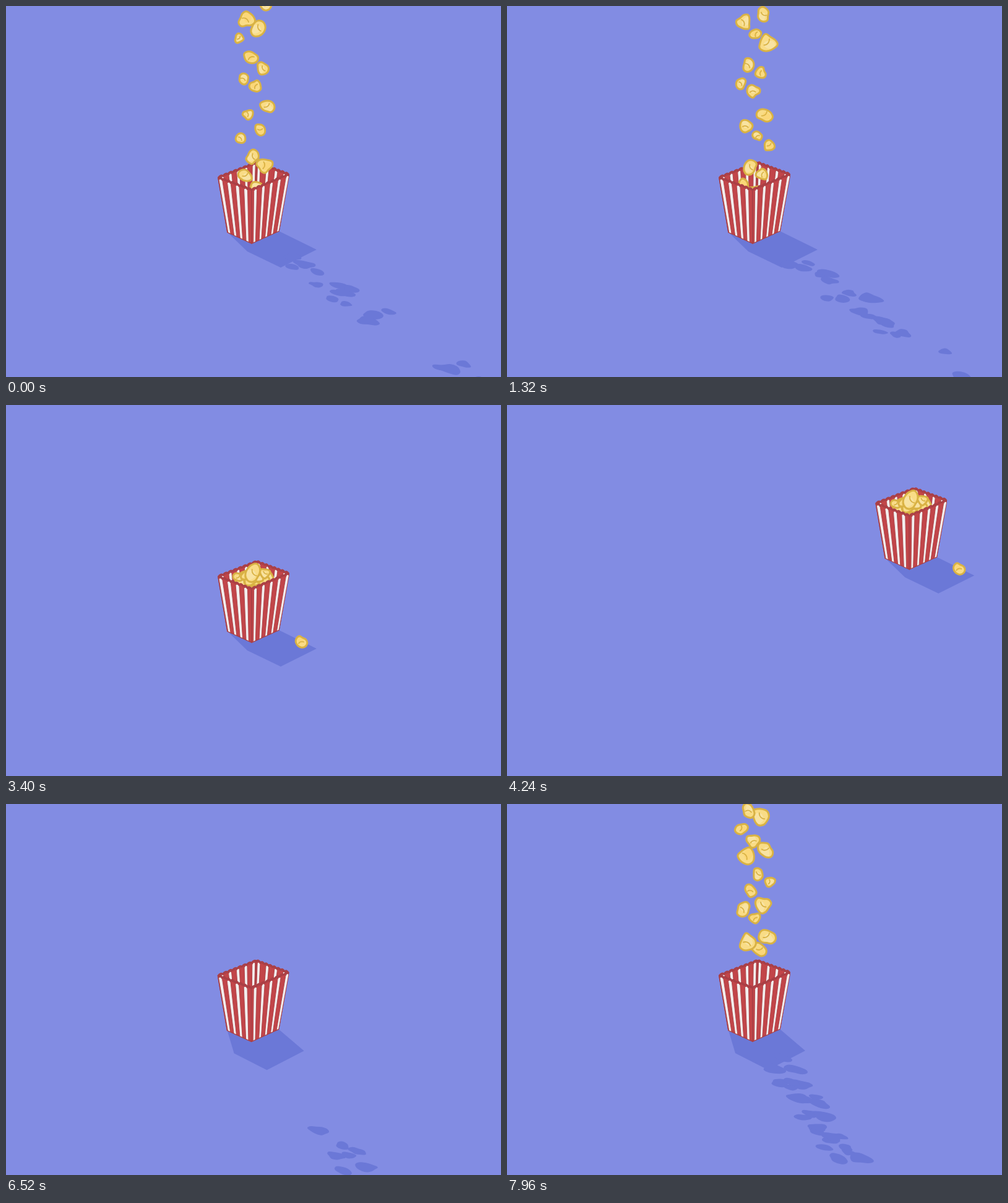
Animation, 800 px wide and 600 px high, one loop 8000 ms. Source, as an HTML page with a canvas:

```html
<!DOCTYPE html>
<html lang="en">
<head>
<meta charset="utf-8">
<title>Popcorn</title>
<style>
html, body { margin: 0; width: 100%; height: 100%; overflow: hidden; background: #828ce3; }
canvas { display: block; width: 100vw; height: 100vh; }
</style>
</head>
<body>
<canvas width="800" height="600"></canvas>
<script>
const ctx = document.querySelector('canvas').getContext('2d');
const LOOP = 8000, SWAP = 4300, FALL = 0.385, GROUND = 368, HIDDEN = 316;
const COLOR = {
  floor: '#828ce3', shade: '#6b78d7', red: '#c24549', rim: '#aa3f45', white: '#f3efee',
  crust: '#d9b244', corn: '#f9dc86', light: '#f8e3a2', warm: '#fbd778'
};

// Box corners: rim in capitals, base in small letters
const L = [343, 278], B = [405, 254], R = [457, 273], F = [397, 298];
const l = [358, 366], b = [402, 346], r = [441, 364], f = [397, 384];

// Light: shadow shift per pixel of height, and outline of the box shadow
const LIGHTS = [
  { kx: 0.55, ky: 0.37, outline: [l, [390, 397], [444, 423], [502, 394], r] },
  { kx: 0.30, ky: 0.41, outline: [l, [369, 403], [422, 430], [482, 399], r] }
];

const rnd = n => { const s = Math.sin(n * 12.9898 + 4.1) * 43758.5453; return s - Math.floor(s); };
const mix = (p, q, u) => [p[0] + (q[0] - p[0]) * u, p[1] + (q[1] - p[1]) * u];
const clamp01 = v => Math.max(0, Math.min(1, v));

// Evenly timed bursts of kernels; each kernel comes to rest a little higher than the last
let seeds = 0;
function volley({ start, step, bursts, perBurst, rest = HIDDEN + 14, rise = 0 }) {
  return Array.from({ length: bursts * perBurst }, (_, i) => {
    const seed = ++seeds;
    const within = (i % perBurst + rnd(seed) * 0.6) / perBurst - 0.5;
    return {
      seed,
      born: start + step * (Math.floor(i / perBurst) + 0.8 * within),
      x: 375 + 50 * (seed * 0.618 % 1),
      size: 8 + 7 * rnd(seed + 200),
      rest: rest - rise * i
    };
  });
}

const showers = [
  [
    ...volley({ start: -690, step: 210, bursts: 4, perBurst: 4 }),
    ...volley({ start: 600, step: 212, bursts: 5, perBurst: 4, rest: 304, rise: 1.5 }),
    ...volley({ start: 1770, step: 160, bursts: 2, perBurst: 1, rest: 272 })
  ],
  [
    ...volley({ start: 6720, step: 180, bursts: 3, perBurst: 3 }),
    ...volley({ start: 7385, step: 130, bursts: 8, perBurst: 3 })
  ]
];

// One kernel bounces off the heap and lands beside the box
const stray = { seed: 90, born: 2017, x: 384, size: 10, rest: 262 };
const HOP_START = stray.born + stray.rest / FALL, HOP_TIME = 480;

function polygon(points) {
  ctx.beginPath();
  points.forEach(p => ctx.lineTo(p[0], p[1]));
  ctx.closePath();
}

// Rounded outline with two or three lobes
function blob(size, seed) {
  const n = 10, lobes = 2 + seed % 2;
  const at = i => {
    const k = i % n, a = k / n * 2 * Math.PI;
    const d = size * (0.8 + 0.17 * Math.cos(lobes * a) + 0.3 * rnd(seed * 17 + k));
    return [d * Math.cos(a), d * Math.sin(a)];
  };
  ctx.beginPath();
  ctx.moveTo(...mix(at(0), at(1), 0.5));
  for (let i = 1; i <= n; i++) ctx.quadraticCurveTo(...at(i), ...mix(at(i), at(i + 1), 0.5));
  ctx.closePath();
}

function pose(k, t) {
  const age = Math.min(t - k.born, k.rest / FALL);
  const spin = (rnd(k.seed + 50) - 0.5) * 0.006;
  return { x: k.x, y: FALL * age, angle: k.seed * 2.4 + spin * age };
}

function strayPose(t) {
  const p = clamp01((t - HOP_START) / HOP_TIME), start = pose(stray, t);
  return {
    x: start.x + 93 * p,
    y: start.y + 121 * p - 220 * p * (1 - p),
    angle: start.angle + 3 * p
  };
}

function drawKernel(k, p) {
  const s = k.size;
  ctx.save();
  ctx.translate(p.x, p.y);
  ctx.rotate(p.angle);
  blob(s, k.seed);
  ctx.fillStyle = COLOR.corn;
  ctx.fill();
  ctx.save();
  ctx.clip();
  ctx.translate(s * 0.25, s * 0.15);
  blob(s * 0.62, k.seed + 7);
  ctx.fillStyle = k.seed % 3 ? COLOR.light : COLOR.warm;
  ctx.fill();
  ctx.strokeStyle = COLOR.crust;
  ctx.lineWidth = 1.8;
  ctx.beginPath();
  ctx.arc(-s * 0.7, -s * 0.5, s * 0.6, -0.3, 1.5);
  ctx.stroke();
  ctx.restore();
  blob(s, k.seed);
  ctx.strokeStyle = COLOR.crust;
  ctx.lineWidth = 3;
  ctx.stroke();
  ctx.restore();
}

function drawKernelShadow(k, p, light) {
  if (p.y > 266) return;
  const ground = GROUND + (rnd(k.seed + 31) - 0.5) * 22;
  const h = ground - p.y;
  ctx.save();
  ctx.translate(p.x + light.kx * h, ground + light.ky * h);
  ctx.transform(1.4, 0.22, 0, 0.58, 0, 0);
  ctx.rotate(p.angle);
  blob(k.size, k.seed);
  ctx.fill();
  ctx.restore();
}

// White stripes sit at first + i * step along the wall
function wall(topA, topB, botA, botB, first, step, width, count) {
  ctx.lineJoin = 'round';
  polygon([topA, topB, botB, botA]);
  ctx.fillStyle = COLOR.red;
  ctx.fill();
  ctx.strokeStyle = COLOR.rim;
  ctx.lineWidth = 1.6;
  ctx.stroke();
  for (let i = 0; i < count; i++) {
    const u = first + i * step, v = u + width;
    const p = mix(topA, topB, u), q = mix(topA, topB, v), m = mix(p, q, 0.5);
    ctx.beginPath();
    ctx.moveTo(...mix(botA, botB, u));
    ctx.lineTo(p[0], p[1] + 3);
    ctx.quadraticCurveTo(m[0], m[1] - 2, q[0], q[1] + 3);
    ctx.lineTo(...mix(botA, botB, v));
    ctx.closePath();
    ctx.fillStyle = COLOR.white;
    ctx.fill();
    ctx.lineWidth = 0.9;
    ctx.stroke();
  }
  ctx.beginPath();
  ctx.moveTo(...topA);
  for (let i = 0; i < 8; i++) {
    const m = mix(topA, topB, (i + 0.5) / 8);
    ctx.quadraticCurveTo(m[0], m[1] - 4.5, ...mix(topA, topB, (i + 1) / 8));
  }
  ctx.lineWidth = 2.8;
  ctx.stroke();
}

// Travel along the floor: out with a cubic, in with a quick stop and a slow settle
function travel(t) {
  if (t < 3992) return 0;
  if (t < SWAP) return 1.05 * ((t - 3992) / 40) ** 3;
  return -199 * Math.exp(-(t - 4320) / 100) - 4 * Math.exp(-(t - 5040) / 640);
}

function draw(t) {
  const second = t >= SWAP ? 1 : 0;
  const light = LIGHTS[second];
  const dx = travel(t);
  const corn = showers[second].map(k => [k, pose(k, t)]);
  const hopping = t > HOP_START + HOP_TIME * 0.35;
  const strayAt = strayPose(t);

  ctx.fillStyle = COLOR.floor;
  ctx.fillRect(0, 0, 800, 600);
  ctx.save();
  ctx.translate(dx, -0.4664 * dx);

  ctx.fillStyle = COLOR.shade;
  polygon(light.outline);
  ctx.fill();
  corn.forEach(([k, p]) => drawKernelShadow(k, p, light));
  if (!second) drawKernelShadow(stray, strayAt, light);

  wall(L, B, l, b, 0.07, 0.205, 0.08, 5);
  wall(B, R, b, r, 0.03, 0.265, 0.09, 4);
  corn.forEach(([k, p]) => { if (p.y < HIDDEN) drawKernel(k, p); });
  if (!second && !hopping) drawKernel(stray, strayAt);
  wall(L, F, l, f, 0.02, 0.25, 0.11, 4);
  wall(F, R, f, r, 0.06, 0.215, 0.085, 5);
  if (!second && hopping) drawKernel(stray, strayAt);
  ctx.restore();
}

function frame() {
  draw(performance.now() % LOOP);
  requestAnimationFrame(frame);
}
frame();
</script>
</body>
</html>
```
